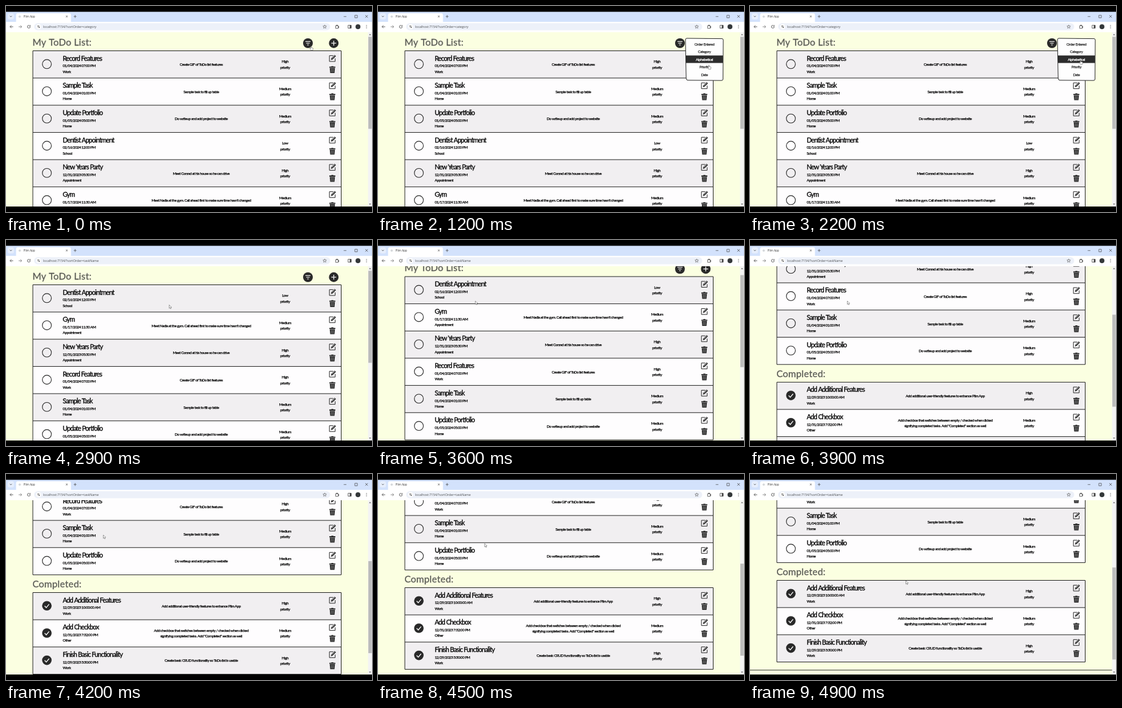
An HTML page with a canvas that plays this animation: 600x338 px, repeating every 5000 ms.

```html
<!DOCTYPE html>
<html lang="en">
<head>
<meta charset="utf-8">
<title>Task list</title>
<style>
  html, body { margin: 0; width: 100%; height: 100%; overflow: hidden; background: #000; }
  canvas { display: block; width: 600px; height: 338px; }
</style>
</head>
<body>
<canvas id="stage"></canvas>
<script>
const W = 600, H = 338, LOOP = 5000, STEP = 100;
const INK = '#292929', PAGE = '#fbffe1';
const TOP = 43, BOTTOM = 329, ROW = 44.65, LEFT = 44, RIGHT = 549.5;

const canvas = document.getElementById('stage');
const ctx = canvas.getContext('2d');
const dpr = window.devicePixelRatio || 1;
canvas.width = W * dpr;
canvas.height = H * dpr;

// Font, letter spacing, extra stroke weight
const STYLES = {
  heading: ['15.3px Lato, sans-serif', 0.3, 0.3],
  title: ['10.8px Lato, sans-serif', -0.83, 0.35],
  small: ['6.2px Lato, sans-serif', -0.48, 0.25],
  url: ['5.23px "Open Sans", sans-serif', 0, 0],
  tab: ['4.5px "Open Sans", sans-serif', 0, 0]
};

const task = (title, date, category, priority, ...lines) => ({ title, date, category, priority, lines });

const entered = [
  task('Record Features', '01/04/2024 07:00 PM', 'Work', 'High', 'Create GIF of ToDo list features'),
  task('Sample Task', '01/04/2024 01:00 PM', 'Home', 'Medium', 'Sample task to fill up table'),
  task('Update Portfolio', '01/05/2024 05:00 PM', 'Home', 'Medium', 'Do writeup and add project to website'),
  task('Dentist Appointment', '02/16/2024 12:00 PM', 'School', 'Low'),
  task('New Years Party', '12/31/2023 05:30 PM', 'Appointment', 'High', 'Meet Conrad at his house so he can drive'),
  task('Gym', '01/17/2024 11:30 AM', 'Appointment', 'Medium',
    "Meet Nadia at the gym. Call ahead first to make sure time hasn't changed")
];
const byTitle = [...entered].sort((a, b) => a.title < b.title ? -1 : 1);
const completed = [
  task('Add Additional Features', '12/29/2023 10:00:00 AM', 'Work', 'High',
    'Add additional user-friendly features to enhance Plim App'),
  task('Add Checkbox', '12/31/2023 7:32:00 PM', 'Other', 'Medium',
    'Add checkbox that switches between empty / checked when clicked',
    'signifying completed tasks. Add "Completed" section as well'),
  task('Finish Basic Functionality', '12/29/2023 3:30:00 PM', 'Work', 'High',
    'Create basic CRUD functionality so ToDo list is usable')
];
const menuItems = ['Order Entered', 'Category', 'Alphabetical', 'Priority', 'Date'];

// Keys: [time, value, ...]
const scrollKeys = [[3500, 0], [3600, 13.5], [3700, 56], [3800, 102], [3900, 137.2], [4000, 158],
  [4100, 170], [4200, 176], [4400, 180], [4600, 188], [4800, 195], [4900, 196]];
const cursorKeys = [[0, 499.5, 66], [100, 499, 65.5], [600, 499, 65.5], [800, 517, 63], [1000, 537, 77],
  [1200, 542, 97], [1400, 542, 97], [1600, 541, 109], [1800, 542, 98], [2000, 541.5, 89],
  [2400, 541.5, 89], [2600, 520, 92], [2800, 350, 108], [3000, 185, 105], [3100, 159.5, 100],
  [4400, 159.5, 100], [4600, 190, 128], [4800, 248, 170], [4900, 255.5, 175]];

function sample(keys, t) {
  if (t <= keys[0][0]) return keys[0].slice(1);
  const i = keys.findIndex(k => k[0] > t);
  if (i < 0) return keys[keys.length - 1].slice(1);
  const a = keys[i - 1], b = keys[i];
  const u = (t - a[0]) / (b[0] - a[0]);
  return a.slice(1).map((v, n) => v + (b[n + 1] - v) * u);
}

function rect(x, y, w, h, color) {
  ctx.fillStyle = color;
  ctx.fillRect(x, y, w, h);
}

function round(x, y, w, h, r, color) {
  ctx.beginPath();
  ctx.roundRect(x, y, w, h, r);
  ctx.fillStyle = color;
  ctx.fill();
}

function line(points, color = INK, width = 1, close = false) {
  ctx.beginPath();
  for (let i = 0; i < points.length; i += 2) ctx.lineTo(points[i], points[i + 1]);
  if (close) ctx.closePath();
  ctx.strokeStyle = color;
  ctx.lineWidth = width;
  ctx.stroke();
}

function disc(x, y, r, color) {
  ctx.beginPath();
  ctx.arc(x, y, r, 0, Math.PI * 2);
  ctx.fillStyle = color;
  ctx.fill();
}

function ring(x, y, r, color, width, from = 0, to = Math.PI * 2) {
  ctx.beginPath();
  ctx.arc(x, y, r, from, to);
  ctx.strokeStyle = color;
  ctx.lineWidth = width;
  ctx.stroke();
}

function text(str, x, y, style, color = '#080808', align = 'left') {
  const [font, spacing, weight] = STYLES[style];
  ctx.font = font;
  ctx.letterSpacing = spacing + 'px';
  ctx.textAlign = align;
  ctx.fillStyle = ctx.strokeStyle = color;
  ctx.fillText(str, x, y);
  if (weight) {
    ctx.lineWidth = weight;
    ctx.strokeText(str, x, y);
  }
}

function at(x, y, draw) {
  ctx.save();
  ctx.translate(x, y);
  draw();
  ctx.restore();
}

function editIcon() {
  line([1.5, -4.6, -4.8, -4.6, -4.8, 5, 4.6, 5, 4.6, 0], INK, 1);
  ctx.beginPath();
  ctx.moveTo(-2.4, 2.6);
  ctx.lineTo(-1.6, -0.4);
  ctx.lineTo(3.8, -5.8);
  ctx.lineTo(5.9, -3.7);
  ctx.lineTo(0.5, 1.7);
  ctx.closePath();
  ctx.fillStyle = INK;
  ctx.fill();
  line([-0.8, 0.2, 4, -4.6], '#eee', 0.8);
}

function trashIcon() {
  round(-5, -4.8, 10, 1.8, 0.6, INK);
  round(-1.8, -5.6, 3.6, 1.2, 0.5, INK);
  ctx.beginPath();
  ctx.moveTo(-4.3, -2.5);
  ctx.lineTo(4.3, -2.5);
  ctx.lineTo(3.5, 5.6);
  ctx.lineTo(-3.5, 5.6);
  ctx.closePath();
  ctx.fillStyle = INK;
  ctx.fill();
  for (const x of [-2, 0, 2]) line([x, -1.4, x * 0.9, 4.4], '#aaa', 0.6);
}

function row(item, index, y, done) {
  rect(LEFT, y, RIGHT - LEFT, ROW, index % 2 ? '#fefdfe' : '#f1eff1');
  if (done) {
    disc(67, y + 21.8, 7.8, INK);
    line([63.4, y + 22, 66, y + 24.8, 70.6, y + 19.2], '#fff', 1.3);
  } else {
    ring(67, y + 21.8, 7.4, INK, 1.1);
  }
  text(item.title, 93, y + 16.1, 'title');
  text(item.date, 93, y + 26.9, 'small');
  text(item.category, 93, y + 36.3, 'small');
  const first = item.lines.length > 1 ? 19.8 : 24.6;
  item.lines.forEach((s, i) => text(s, 320, y + first + i * 9.5, 'small', '#080808', 'center'));
  text(item.priority, 457.5, y + 19.8, 'small', '#080808', 'center');
  text('priority', 457.5, y + 29.3, 'small', '#080808', 'center');
  at(535, y + 12.5, editIcon);
  at(535, y + 30.8, trashIcon);
}

function table(items, y, done) {
  items.forEach((item, i) => row(item, i, y + i * ROW, done));
  for (let i = 0; i <= items.length; i++) line([LEFT, y + i * ROW, RIGHT, y + i * ROW], '#222');
  const end = y + items.length * ROW;
  line([LEFT, y, LEFT, end], '#222');
  line([RIGHT, y, RIGHT, end], '#222');
}

function page(items, scroll) {
  ctx.save();
  ctx.beginPath();
  ctx.rect(0, TOP, W, BOTTOM - TOP);
  ctx.clip();
  rect(0, TOP, W, BOTTOM - TOP, PAGE);
  ctx.translate(0, -scroll);
  text('My ToDo List:', 43.5, 64.6, 'heading', '#5a5a56');
  disc(495, 61, 8, INK);
  [4.2, 2.7, 1.2].forEach((w, i) => line([495 - w, 58.3 + i * 2.8, 495 + w, 58.3 + i * 2.8], '#fff', 1.1));
  disc(537.3, 61, 7.9, INK);
  line([533.3, 61, 541.3, 61], '#fff', 1.2);
  line([537.3, 57, 537.3, 65], '#fff', 1.2);
  table(items, 73.5, false);
  text('Completed:', 43.5, 362.2, 'heading', '#5a5a56');
  table(completed, 370.5, true);
  line([0, 517.8, 594, 517.8], '#333');
  ctx.restore();
}

function triangle(x, y, dir) {
  ctx.beginPath();
  ctx.moveTo(x - 1.7, y + dir);
  ctx.lineTo(x + 1.7, y + dir);
  ctx.lineTo(x, y - dir);
  ctx.fillStyle = '#666';
  ctx.fill();
}

function scrollbar(scroll) {
  rect(593.5, TOP, 6.5, BOTTOM - TOP, '#f3f3f3');
  rect(594, 50.5 + scroll * 0.525, 5.6, 151, '#bcbcbc');
  triangle(596.8, 46.8, 1);
  triangle(596.8, 325.2, -1);
}

function chrome(order) {
  const dark = '#444';
  rect(0, 9.5, W, 17, '#d3e2fc');
  round(2.8, 12, 10.4, 10, 3, '#e6eefc');
  line([6.4, 16.3, 8, 17.9, 9.6, 16.3], dark, 0.8);
  round(16.5, 12, 90, 16, [3, 3, 0, 0], '#fff');
  disc(22.5, 17.3, 1.9, '#d6d9dc');
  text('Plim App', 28.8, 19.1, 'tab', '#333');
  line([98.2, 15.8, 101, 18.6], dark, 0.7);
  line([101, 15.8, 98.2, 18.6], dark, 0.7);
  line([111, 17.2, 115.6, 17.2], dark, 0.7);
  line([113.3, 14.9, 113.3, 19.5], dark, 0.7);
  line([553.6, 17.3, 558, 17.3], dark, 0.7);
  line([571.9, 15.2, 576, 15.2, 576, 19.3, 571.9, 19.3], dark, 0.7, true);
  line([589, 15, 593.2, 19.2], dark, 0.7);
  line([593.2, 15, 589, 19.2], dark, 0.7);

  rect(0, 26, W, TOP - 26, '#fff');
  line([11.8, 34, 6.6, 34], dark, 0.8);
  line([8.9, 31.7, 6.6, 34, 8.9, 36.3], dark, 0.8);
  line([20.7, 34, 25.8, 34], '#777', 0.8);
  line([23.5, 31.7, 25.8, 34, 23.5, 36.3], '#777', 0.8);
  ring(37.4, 34, 2.3, dark, 0.8, 0, 5.2);
  line([39.8, 31.1, 39.8, 33.2, 37.8, 33.2], dark, 0.7);

  round(46, 28.3, 485.5, 11.4, 5.7, '#edf1f9');
  disc(53.6, 34, 4, '#fff');
  line([51.6, 32.9, 55.6, 32.9], dark, 0.5);
  line([51.6, 35.1, 55.6, 35.1], dark, 0.5);
  disc(52.6, 32.9, 0.8, dark);
  disc(54.6, 35.1, 0.8, dark);
  text('localhost:7154/?sortOrder=' + order, 61, 35.8, 'url', '#4a4d50');

  const star = [];
  for (let i = 0; i < 10; i++) {
    const a = -Math.PI / 2 + i * Math.PI / 5, r = i % 2 ? 1.4 : 3;
    star.push(522.5 + r * Math.cos(a), 34 + r * Math.sin(a));
  }
  line(star, dark, 0.6, true);
  line([540.4, 32.2, 544.8, 32.2, 544.8, 36.7, 540.4, 36.7], dark, 0.8, true);
  disc(542.6, 31.8, 1, dark);
  disc(545.2, 34.4, 1, dark);
  line([560.8, 31.6, 566, 31.6, 566, 36.4, 560.8, 36.4], dark, 0.8, true);
  rect(563.6, 31.6, 2.4, 4.8, dark);
  disc(577, 34, 4, '#34383a');
  for (const y of [31.9, 34, 36.1]) disc(591, y, 0.6, dark);
}

function menu(active) {
  ctx.beginPath();
  ctx.moveTo(506, 53);
  ctx.lineTo(564, 53.6);
  ctx.quadraticCurveTo(566, 53.6, 566, 56);
  ctx.lineTo(565.6, 120);
  ctx.quadraticCurveTo(565.6, 122.2, 563, 122.2);
  ctx.lineTo(508, 121.8);
  ctx.quadraticCurveTo(505.4, 121.8, 505.2, 119);
  ctx.lineTo(504, 56);
  ctx.quadraticCurveTo(504, 53, 506, 53);
  ctx.fillStyle = '#fefefe';
  ctx.fill();
  ctx.strokeStyle = INK;
  ctx.lineWidth = 1;
  ctx.stroke();
  menuItems.forEach((name, i) => {
    const y = 62.4 + i * 12.5;
    if (i === active) rect(505, y - 6.2, 60.6, 12.3, '#2c2c2c');
    text(name, 535, y + 2.1, 'small', i === active ? '#fff' : '#333', 'center');
  });
}

function shape(points) {
  ctx.beginPath();
  for (let i = 0; i < points.length; i += 2) ctx.lineTo(points[i], points[i + 1]);
  ctx.closePath();
  ctx.fillStyle = '#fff';
  ctx.fill();
  ctx.strokeStyle = '#444';
  ctx.lineWidth = 0.5;
  ctx.stroke();
}

const arrow = () => shape([0, 0, 0, 5.6, 1.3, 4.4, 2.2, 6.4, 3.1, 6, 2.3, 4, 4, 4]);
const hand = () => shape([0, 0, 0.9, 0, 1, 2.4, 3.6, 3, 4, 4, 3.4, 6.8, 0.4, 6.8, -1.8, 4, -1.2, 3.4, -0.2, 4.2]);

// The highlight trails the pointer by one step.
function hovered(t) {
  if (t < 900) return -1;
  const y = sample(cursorKeys, t - STEP)[1];
  return Math.max(0, Math.min(4, Math.floor((y - 56.2) / 12.5)));
}

function draw(time) {
  let t = Math.floor(time / STEP) * STEP;
  if (t === 1300) t = 1200; // this pose holds for two steps
  const sorted = t >= 2400;
  const [scroll] = sample(scrollKeys, t);
  const [x, y] = sample(cursorKeys, t);
  ctx.setTransform(dpr, 0, 0, dpr, 0, 0);
  rect(0, 0, W, H, '#000');
  chrome(sorted ? 'taskName' : 'category');
  page(sorted ? byTitle : entered, scroll);
  scrollbar(scroll);
  if (t >= 700 && !sorted) menu(hovered(t));
  at(x, y, sorted ? arrow : hand);
}

const start = performance.now();
function tick() {
  draw((performance.now() - start) % LOOP);
  requestAnimationFrame(tick);
}
tick();
</script>
</body>
</html>
```
